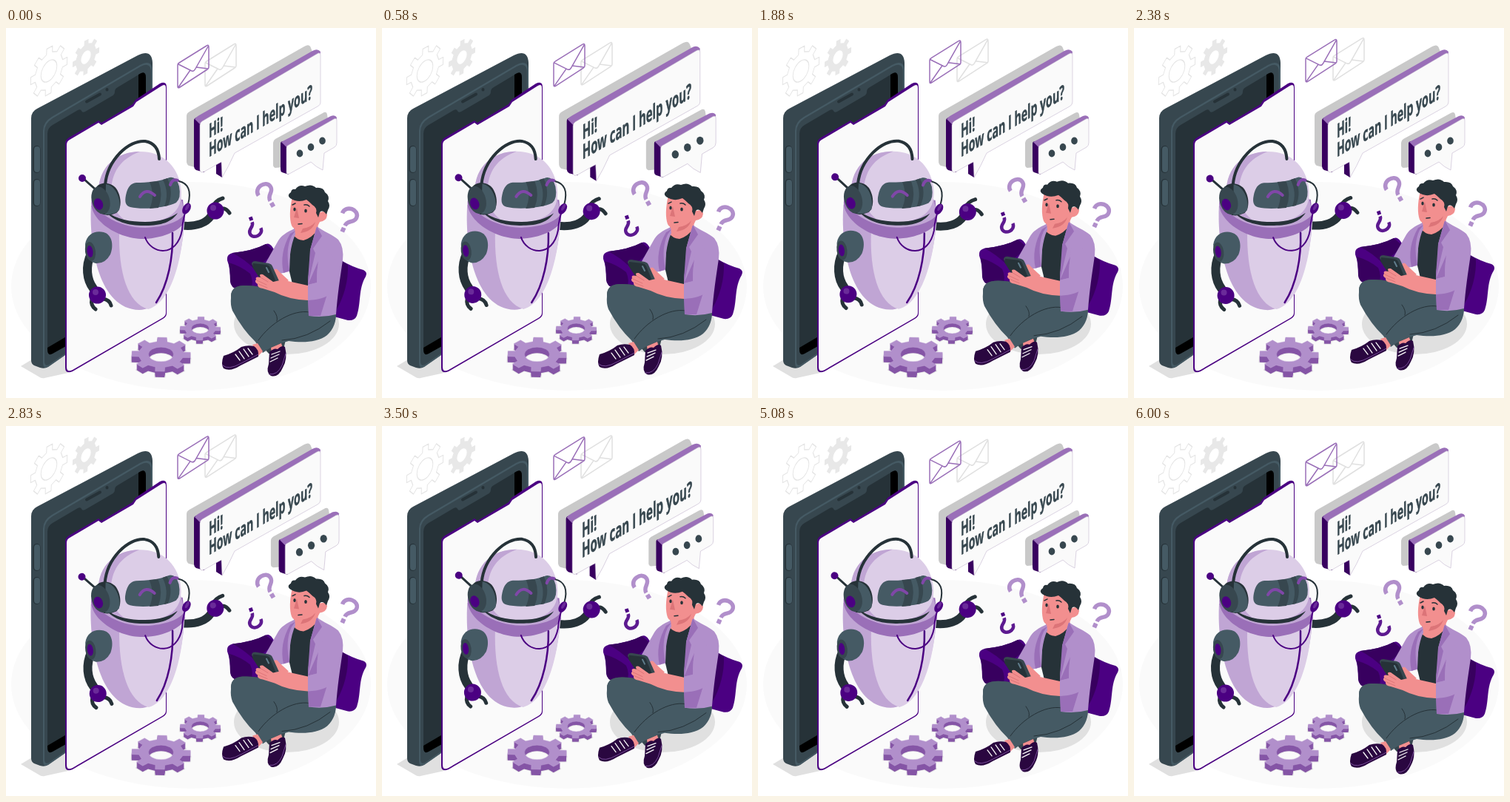
An HTML page that plays this animation: 500x500 px, repeating every 6.04 s.

```html
<!DOCTYPE html>
<html lang="en">
<head>
<meta charset="utf-8">
<title>Chatbot</title>
<style>
html, body { margin: 0; height: 100%; overflow: hidden; background: #fff; }
svg { display: block; width: 100vw; height: 100vh; }
text { font: 700 26.5px "Open Sans", "Noto Sans", sans-serif; fill: #37474f; stroke: #37474f; stroke-width: .5; }
.line { fill: none; stroke-linecap: round; stroke-linejoin: round; }
.ink { fill: #4b0082; } .deep { fill: #38005f; } .shoe { fill: #2a0740; }
.mid { fill: #9a6fb8; } .lilac { fill: #b18fcb; } .pale { fill: #dccde7; } .soft { fill: #c0a5d4; }
.black { fill: #263238; } .slate { fill: #37474f; } .steel { fill: #455a64; }
.paper { fill: #fafafa; } .skin { fill: #f28f8f; }
</style>
</head>
<body>
<svg viewBox="0 0 500 500">
  <defs>
    <g id="mail" class="line" stroke-width="1.5">
      <path d="M232 50Q232 48 234 47L271 24Q274 22 274 26V53Q274 55 272 56L235 80Q232 82 232 79ZM233 49L251 58Q254 59 256 55L273 25M233 80L249 57M273 55L257 53"/>
    </g>
    <g id="mark">
      <path class="line" style="stroke-linecap:butt" stroke-width="5.5" d="M-10-4C-11-17 10-18 10-6C10 2 0 1 0 10"/>
      <path stroke="none" d="M-3 13H3V19H-3Z"/>
    </g>
  </defs>

  <ellipse class="paper" cx="250" cy="349" rx="243" ry="141"/>
  <ellipse cx="379" cy="400" rx="71" ry="41" fill="#e0e0e0"/>
  <g id="wallGears"></g>

  <!-- phone -->
  <path fill="#e0e0e0" d="M20 457L40 445L84 443V466L52 473Q48 474 44 471Z"/>
  <path class="slate" d="M34 122Q34 113 42 109L178 37Q197 28 198 47V360L57 458Q52 461 46 459L38 456Q34 454 34 449Z"/>
  <path class="steel" d="M50 139Q50 127 62 120L181 50Q198 41 198 59V360L58 457Q50 462 50 452Z"/>
  <path class="slate" d="M52 140Q52 129 63 122L182 52Q196 45 196 60V360L58 455Q52 458 52 450Z"/>
  <path class="black" d="M56 143Q56 135 63 131L97 111Q101 109 102 112Q103 115 107 113L143 92Q147 90 147 86Q147 82 151 80L181 62Q189 57 189 67V360L63 440Q56 444 56 434Z"/>
  <path d="M179 63Q189 56 189 67V110H179ZM56 432L90 412V425L63 440Q56 444 56 434Z"/>
  <path class="line" stroke="#263238" stroke-width="4" d="M109 99.500L127 89.500M136.500 83.500V83"/>
  <path class="line" stroke="#263238" stroke-width="10" d="M41.500 164V191M41.500 209V236"/>
  <path class="line" stroke="#455a64" stroke-width="8" d="M42 164V191M42 209V236"/>
  <path class="ink" d="M80 156Q80 151 85 148L125 125L129 128L171 103L175 97L208 75Q217 71 217 80V386Q217 390 212 393L90 464Q80 468 80 459Z"/>
  <path class="paper" d="M82 158Q82 153 86 151L125 128L129 131L172 106L176 100L209 79Q216 74 216 81V385Q216 389 211 392L90 462Q82 466 82 458Z"/>

  <!-- floor gears -->
  <g id="floorGears"></g>

  <g id="robot">
    <path class="line" stroke="#263238" stroke-width="11" d="M238 267C258 269 271 263 277 254"/>
    <path class="line" stroke="#263238" stroke-width="5" d="M279 242Q283 233 293 230M288 248Q294 239 302 250"/>
    <circle class="ink" cx="283" cy="247" r="11.500"/>
    <circle cx="280" cy="243" r="4" fill="#6a2b99"/>
    <path class="soft" d="M115 240C112 295 125 380 180 381C222 380 239 310 242 250Z"/>
    <path class="pale" d="M153 276C152 330 164 372 192 380C226 370 239 305 241 258Z"/>
    <path class="mid" d="M116 232C110 255 146 285 186 285C215 284 238 272 242 260L239 232Z"/>
    <path class="soft" d="M118 228C116 247 150 270 188 270C214 269 236 262 242 250L235 225L130 218Z"/>
    <path class="line" stroke="#4b0082" stroke-width="2" d="M188 283C196 306 231 311 238 273Q239 258 243 247"/>
    <path class="line" stroke="#4b0082" stroke-width="2.500" d="M225 277C226 310 219 347 203 371"/>

    <path class="pale" d="M125 222C125 187 150 167 181 167C211 167 231 185 236 213C241 244 225 261 188 263C148 262 125 247 125 222Z"/>
    <path class="soft" d="M125 222C125 187 150 167 181 167C155 177 142 194 142 224Q143 247 160 259C140 254 125 242 125 222Z"/>
    <path class="black" d="M134 247C150 259 168 262 188 262C208 262 222 257 232 250C222 265 205 267 186 267C166 267 146 262 134 247Z"/>
    <path class="steel" d="M176 209C190 209 207 208 221 202Q230 200 234 214Q237 230 230 236C217 243 184 246 168 242Q159 240 162 226Q165 210 176 209Z"/>
    <path class="slate" d="M194 208L206 207Q213 225 206 243L194 244Q202 227 194 208ZM212 205L218 203Q227 222 219 240L214 241Q221 223 212 205Z"/>
    <path class="line" stroke="#8047a8" stroke-width="4" stroke-linecap="butt" d="M181 228Q189 215 201 226M222 212Q225 203 232 206"/>
    <path class="line" stroke="#263238" stroke-width="4" d="M134 212C137 178 166 151 188 153Q206 156 207 177"/>
    <path class="line" stroke="#263238" stroke-width="2" d="M234 207C246 210 251 220 246 238"/>
    <path class="line" stroke="#263238" stroke-width="3" d="M104 203L123 220"/>
    <circle class="ink" cx="103" cy="203" r="5"/>
    <path class="black" d="M121 217C125 208 141 207 149 217C157 229 156 245 149 250Q136 256 128 250Z"/>
    <path class="steel" d="M135 211C149 213 156 233 153 246Q146 253 134 252Z"/>
    <ellipse class="slate" cx="128" cy="233" rx="12" ry="19" transform="rotate(-16 128 233)"/>
    <ellipse class="ink" cx="125" cy="238" rx="6" ry="8" transform="rotate(-20 125 238)"/>
    <ellipse class="ink" cx="244" cy="244" rx="5" ry="8" transform="rotate(30 244 244)"/>
    <ellipse cx="245" cy="242" rx="2" ry="5" transform="rotate(30 245 242)" fill="#6a2b99"/>

    <path class="line" stroke="#263238" stroke-width="12" d="M115 305C107 322 109 340 118 352"/>
    <path class="steel" d="M107 292C109 278 121 273 132 276C143 279 146 293 141 306Q134 319 121 318Q107 314 107 292Z"/>
    <ellipse class="slate" cx="114" cy="302" rx="7" ry="13" transform="rotate(-8 114 302)"/>
    <ellipse class="ink" cx="113.500" cy="302" rx="4" ry="8" transform="rotate(-8 113 302)"/>
    <path class="line" stroke="#263238" stroke-width="5" d="M116 366Q114 375 121 380M131 366Q140 367 142 375"/>
    <circle class="ink" cx="123.500" cy="361" r="11.500"/>
    <circle cx="121" cy="357" r="4" fill="#6a2b99"/>
  </g>

  <g id="bigBubble">
    <path fill="#c9c9c9" d="M244 119Q244 115 248 113L403 25Q410 21 412 27L417 40L262 180L255 188L247 186Q244 184 244 180Z"/>
    <path class="deep" d="M254 125Q254 121 259 121L268 130V195L257 192Q254 190 254 187ZM284 184V197L292 202L294 180Z"/>
    <path class="mid" d="M255 123Q257 120 261 118L414 31Q421 27 425 32L424 40L262 130Z"/>
    <path class="paper" stroke="#b9a9c6" stroke-width=".5" d="M262 131Q262 128 265 126L420 35Q425 32 425 37V100Q425 104 421 106L309 169Q301 187 292 202L291 181L268 194Q262 197 262 191Z"/>
    <text transform="matrix(.535 -.304 0 1 274 149)">Hi!</text>
    <text transform="matrix(.535 -.304 0 1 274 174.500)">How can I help you?</text>
  </g>
  <g id="smallBubble">
    <path fill="#c9c9c9" d="M361 155Q361 152 364 150L428 115Q433 112 434 117L436 130L375 188L364 189Q361 188 361 185Z"/>
    <path class="deep" d="M371 156Q371 153 375 153L384 162L382 198L373 195Q371 194 371 191Z"/>
    <path class="mid" d="M372 154L439 119Q445 117 447 121L446 126L379 161Z"/>
    <path class="paper" stroke="#b9a9c6" stroke-width=".5" d="M379 162Q379 159 382 158L443 123Q447 121 447 125V155Q447 159 444 161L430 169L428 192Q419 188 412 181L383 197Q379 199 379 195Z"/>
    <g class="slate">
      <ellipse cx="397" cy="169.500" rx="4.300" ry="5"/>
      <ellipse cx="412" cy="161" rx="4.300" ry="5"/>
      <ellipse cx="427.500" cy="152.500" rx="4.300" ry="5"/>
    </g>
  </g>

  <g id="floating">
    <use href="#mail" x="37" y="-2" stroke="#e0e0e0"/>
    <use href="#mail" stroke="#9a6fb8"/>
    <use href="#mark" class="lilac" stroke="#b18fcb" transform="translate(352 225) rotate(-30)"/>
    <use href="#mark" class="lilac" stroke="#b18fcb" transform="translate(462 258) rotate(24)"/>
    <use href="#mark" class="ink" stroke="#5d1a90" transform="translate(335.500 270) rotate(160) scale(.82)"/>

    <!-- pillows -->
    <path class="ink" d="M299 311Q299 306 306 304Q334 301 351 292Q356 290 360 296L376 320L352 353L314 353Q304 352 303 342Q303 324 299 314Z"/>
    <path class="deep" d="M301 317Q318 322 330 332Q335 343 331 353H314Q304 352 303 342Q303 327 301 317ZM306 304Q334 301 351 292L364 303L336 326Q322 312 306 304Z"/>
    <path class="ink" d="M451 313Q468 323 483 327Q489 330 486 336C476 352 480 372 474 389Q471 396 462 395L436 388Z"/>
    <path class="deep" d="M451 313L462 320Q463 352 446 382L438 388Z"/>

    <!-- legs -->
    <path class="slate" d="M304 365Q303 349 320 348Q342 347 360 355L398 373L386 388L374 438L355 440C335 414 306 390 304 365Z"/>
    <path class="steel" d="M304 365Q303 349 320 348Q342 347 360 355L412 364L446 383Q447 403 434 415C420 426 398 425 382 423Q361 428 347 439L337 424Q320 408 306 382Q303 374 304 365Z"/>
    <path class="line" stroke="#263238" d="M410 384C388 380 358 398 341 422M373 422Q408 420 438 396M362 382Q368 390 366 396"/>

    <!-- shoes -->
    <path class="skin" d="M333 428L340 426L347 437L341 443ZM358 432L372 426L375 436L359 440Z"/>
    <path class="shoe" d="M294 443Q308 439 318 431Q326 428 335 430Q342 434 341 444L317 456Q303 465 294 460Q290 454 294 443Z"/>
    <path class="shoe" d="M356 438Q362 432 367 434Q373 428 377 431Q381 447 374 459Q368 473 358 470Q351 466 355 454Z"/>
    <path class="line" stroke="#fafafa" stroke-width="1.300" d="M310 441L316 449M315 437L322 447M321 434L328 444M327 433L333 441M357 451L367 446M358 446L369 441M359 441L370 437"/>
    <path class="line" stroke="#8a5bad" stroke-width=".8" d="M293 456Q300 463 318 453L341 441M356 468Q367 469 373 456L378 440"/>

    <!-- torso -->
    <path class="black" d="M386 277L424 273L418 350H388L382 325Z"/>
    <path class="skin" d="M390 264H421L422 272Q413 284 402 287Q392 286 388 279Z"/>
    <path class="lilac" d="M390 271C379 276 371 281 367 289L350 319L366 333L383 329L384 306Q386 290 391 279Z"/>
    <path class="mid" d="M391 274L386 281Q377 300 383 328L375 331Q369 304 384 278Z"/>
    <path class="lilac" d="M420 268C429 275 441 279 449 286Q457 296 455 314C451 341 448 360 446 387Q428 392 409 389L408 340Q411 323 411 300Z"/>
    <path class="mid" d="M420 268L427 281L415 298L418 304L408 347V340L411 300ZM408 368Q428 364 437 350L425 389H409ZM426 306Q418 327 421 344L408 347Z"/>
    <path class="lilac" d="M423 305Q420 327 420 344L408 347V368Q431 367 441 357L451 322L433 296Z"/>

    <!-- phone and hands -->
    <path class="skin" d="M360 329Q365 322 369 329L382 341L365 352Z"/>
    <path class="slate" d="M332 319Q332 315 337 315L355 318Q359 319 360 322L370 344L350 350Z"/>
    <path class="black" d="M334 318L352 320Q356 321 357 324L366 346L351 351L333 323Z"/>
    <path class="line" stroke="#607d8b" stroke-width="2" d="M352 324L355 330"/>
    <path class="skin" d="M408 348L381 342Q373 335 369 330Q366 332 370 341L361 343L347 333Q341 332 344 337Q336 335 338 340Q335 343 340 346Q339 351 347 352L363 357Q382 367 408 368Z"/>
    <path class="line" stroke="#d86f74" stroke-width=".8" d="M344 337L354 343M339 341L352 347M341 346L353 351"/>

    <!-- head -->
    <path class="skin" d="M387 228C383 245 383 258 386 267Q389 274 401 272Q414 276 421 268L424 262Q433 261 434 253Q433 246 425 249L422 230Z"/>
    <path fill="#dc7478" d="M401 271Q413 269 418 262Q414 275 398 277ZM393 243L389 256L396 257Z"/>
    <path class="black" d="M384 230Q379 226 385 222Q386 217 391 218Q396 211 404 214Q413 210 419 216Q429 215 431 222Q438 227 435 234Q439 240 435 246L433 252Q428 245 424 249L422 256L419 250Q421 243 414 239Q409 234 406 232Q394 237 384 230Z"/>
    <path class="line" stroke="#263238" stroke-width="1.500" d="M387 239L391 237M403 239Q407 238 410 241M395 265L400 264.500"/>
    <ellipse class="black" cx="390" cy="245" rx="1.700" ry="2.500"/>
    <ellipse class="black" cx="405" cy="247" rx="1.800" ry="2.500"/>
  </g>
</svg>
<script>
const LOOP = 6040;
const $ = id => document.getElementById(id);

// Closed outline of a gear with eight flat teeth and a round hole.
function gearPath(r, hole) {
  const points = [];
  for (let i = 0; i < 8; i++) {
    for (const [turn, size] of [[-.27, .76], [-.2, 1], [.2, 1], [.27, .76]]) {
      const a = (i + turn + .05) * Math.PI / 4;
      points.push((Math.cos(a) * r * size).toFixed(2) + ' ' + (Math.sin(a) * r * size).toFixed(2));
    }
  }
  return `M${points.join('L')}ZM${hole} 0A${hole} ${hole} 0 1 0 ${-hole} 0A${hole} ${hole} 0 1 0 ${hole} 0Z`;
}

function gear(r, hole, matrix, style) {
  return `<path d="${gearPath(r, hole)}" fill-rule="evenodd" stroke-linejoin="round" transform="matrix(${matrix})" ${style}/>`;
}

function floorGear(x, y, r, hole, depth) {
  const layer = (dy, style) => gear(r, hole, `1 0 0 .58 ${x} ${y + dy}`, style);
  let out = layer(depth, 'fill="none" stroke="#e8e8e8" stroke-width="3"');
  for (let dy = depth; dy > 0; dy--) out += layer(dy, 'fill="#8555a6"');
  return out + layer(0, 'class="lilac" stroke="#c0a5d4" stroke-width=".6"');
}

$('wallGears').innerHTML =
  gear(30, 13, '.83 -.5 0 1.050 58 58', 'fill="none" stroke="#e4e4e4" stroke-width="1.200"') +
  gear(22, 8, '.83 -.5 0 1.050 108 39.500', 'fill="#e8e8e8"');
$('floorGears').innerHTML =
  floorGear(209.500, 441, 40, 17, 8) + floorGear(262.500, 406, 27.500, 12, 5);

// Piecewise linear double beat over one cycle.
const beats = [[0, 1], [.1, 1.1], [.3, 1], [.4, 1], [.5, 1.1], [.6, 1], [1, 1]];
function beat(p) {
  const i = beats.findIndex(b => p < b[0]);
  const [p0, s0] = beats[i - 1], [p1, s1] = beats[i];
  return s0 + (s1 - s0) * (p - p0) / (p1 - p0);
}

function sway(p) {
  return p < .25 ? p * 4 : p < .75 ? 2 - p * 4 : p * 4 - 4;
}

const phase = (t, period) => t % period / period;
const move = (id, value) => $(id).setAttribute('transform', value);
const zoom = (id, x, y, s) => move(id, `translate(${x} ${y}) scale(${s}) translate(${-x} ${-y})`);

function draw(now) {
  const t = now % LOOP;
  const rise = 10 * (1 - Math.abs(1 - 2 * phase(t, 6000)));
  move('floating', `translate(0 ${-rise})`);
  move('robot', `rotate(${sway(phase(t, 1500))} 201 267)`);
  zoom('bigBubble', 335, 113, beat(phase(t, 3000)));
  zoom('smallBubble', 404, 156, beat(phase(t, 6000)));
  requestAnimationFrame(() => draw(performance.now() - start));
}

const start = performance.now();
draw(0);
</script>
</body>
</html>
```
